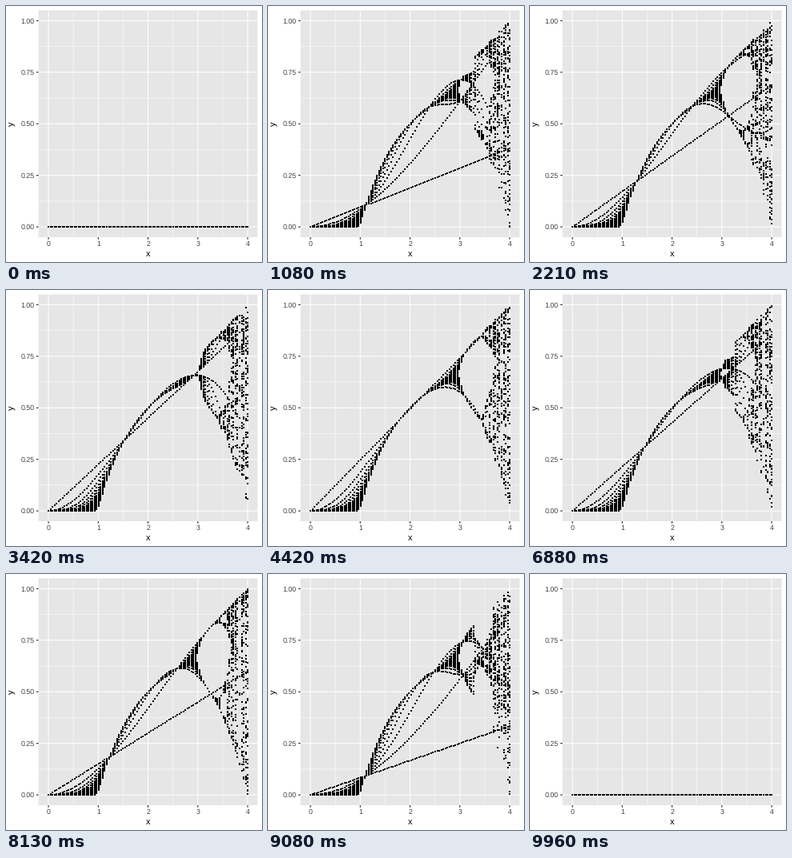
A matplotlib script that plays this animation: 320x320 px, repeating every 10000 ms.

```python
import numpy as np
import matplotlib.pyplot as plt
from matplotlib.animation import FuncAnimation
from matplotlib.patches import Rectangle

SIZE, DPI = 320, 80
PX = 72 / DPI                      # points per pixel
FRAMES, LOOP = 240, 10000
STARTS, RATES, STEPS = 50, 100, 50

LEFT, RIGHT, TOP, BOTTOM = 40.6, 314.5, 5.5, 289.0
PANEL, LABEL, TICK = "#e6e6e6", "#404040", "#272727"

plt.rcParams["font.family"] = "Liberation Sans"
plt.rcParams["text.hinting"] = "none"


def to_x(r):
    pad = (RIGHT - LEFT) / 22
    return LEFT + pad + r / 4 * (RIGHT - LEFT - 2 * pad)


def to_y(v):
    pad = (BOTTOM - TOP) / 22
    return BOTTOM - pad - v * (BOTTOM - TOP - 2 * pad)


def logistic_orbits():
    """Orbits of the logistic map, indexed by start, step and rate."""
    rate = np.linspace(0, 4, RATES)
    value = np.repeat(np.linspace(0, 1, STARTS)[:, None], RATES, axis=1)
    orbit = []
    for _ in range(STEPS):
        value = rate * value * (1 - value)
        orbit.append(value)
    return rate, np.stack(orbit, axis=1)


rates, orbits = logistic_orbits()
key_frames = np.round(np.linspace(0, FRAMES - 1, STARTS))

fig = plt.figure(figsize=(SIZE / DPI, SIZE / DPI), dpi=DPI, facecolor="white")
ax = fig.add_axes([0, 0, 1, 1])
ax.set_xlim(0, SIZE)
ax.set_ylim(SIZE, 0)
ax.axis("off")


def line(xs, ys, color, width):
    ax.plot(xs, ys, color=color, lw=width * PX, solid_capstyle="butt",
            snap=False, zorder=2)


def label(x, y, text, size, color, **kw):
    ax.text(x, y, text, fontsize=size * PX, color=color, **kw)


ax.add_patch(Rectangle((LEFT, TOP), RIGHT - LEFT, BOTTOM - TOP,
                       fc=PANEL, lw=0, snap=False, zorder=1))

for half in (0.5, 1.5, 2.5, 3.5):
    line([to_x(half)] * 2, [TOP, BOTTOM], "white", 0.53)
    line([LEFT, RIGHT], [to_y(half / 4)] * 2, "white", 0.53)

for i in range(5):
    x, y = to_x(i), to_y(i / 4)
    line([x, x], [TOP, BOTTOM], "white", 1.07)
    line([LEFT, RIGHT], [y, y], "white", 1.07)
    line([x, x], [BOTTOM, BOTTOM + 2.75], TICK, 1.07)
    line([LEFT - 2.75, LEFT], [y, y], TICK, 1.07)
    label(x, 300.2, str(i), 8.8, LABEL, ha="center", va="baseline")
    label(35.6, y + 3.1, f"{i / 4:.2f}", 8.8, LABEL, ha="right", va="baseline")

label(to_x(2), 313, "x", 11, "black", ha="center", va="baseline")
label(13.2, to_y(0.5), "y", 11, "black", rotation=90,
      ha="right", va="center")

dot_x = np.tile(np.round(to_x(rates)), STEPS)
dots, = ax.plot([], [], ls="none", marker="s", ms=2 * PX, mew=0,
                color="black", zorder=3)


def draw(frame):
    # Blend linearly between the two nearest starting values.
    pos = np.interp(frame, key_frames, np.arange(STARTS))
    lo = min(int(pos), STARTS - 2)
    mix = pos - lo
    values = (1 - mix) * orbits[lo] + mix * orbits[lo + 1]
    dots.set_data(dot_x, np.round(to_y(values)).ravel())
    return dots,


anim = FuncAnimation(fig, draw, frames=FRAMES, interval=LOOP / FRAMES,
                     repeat=True, repeat_delay=0)
plt.show()
```
